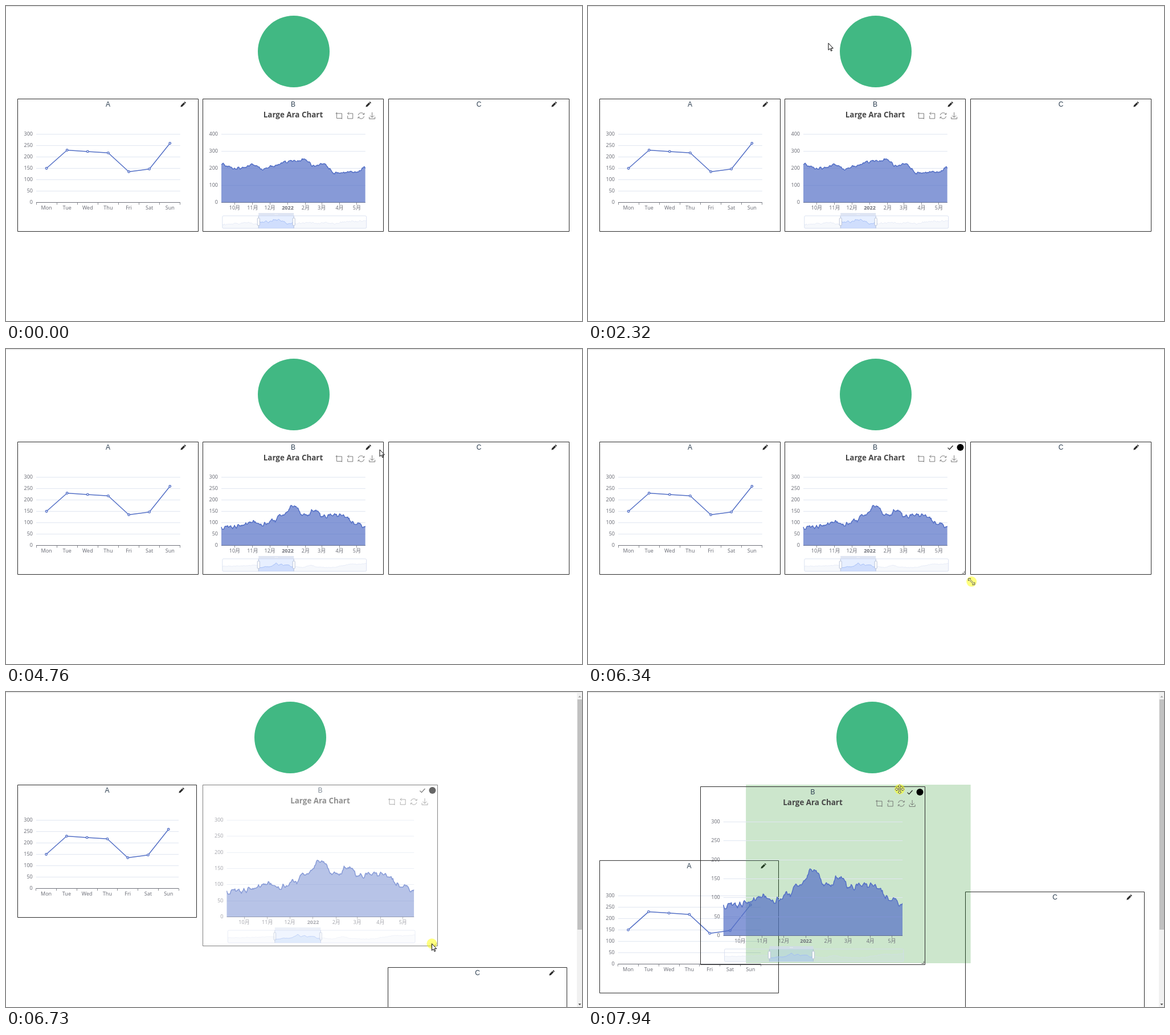
Recreate the animation shown at these times as an HTML page with a canvas. Size 1011 px wide and 554 px high, loop 8000 ms.

```html
<!DOCTYPE html>
<html lang="en">
<head>
<meta charset="utf-8">
<title>Chart dashboard</title>
<style>
html, body { margin: 0; width: 100%; height: 100%; overflow: hidden; background: #fff; }
canvas { display: block; }
</style>
</head>
<body>
<canvas id="stage" width="1011" height="554"></canvas>
<script>
const ctx = document.getElementById('stage').getContext('2d');
const LOOP = 8000, LAST_CHANGE = 7940;
const BLUE = '#5470c6', AXIS = '#6e7079', INK = '#2c3e50', BORDER = '#2a2a2a';
const LABEL_FONT = '9px "Noto Sans", "Noto Sans CJK SC", "Noto Sans CJK", sans-serif';
const TITLE_FONT = 'bold 13.4px "Open Sans", "Noto Sans", sans-serif';
const ROW_TOP = 163.5, ROW_PUSH = 321;

const RELOAD = { blank: 2900, shell: 3140, lineChart: 3220, areaChart: 3342 };
const EDIT = 5100, RESIZE = 6350, REFLOW = 6500, RELEASE = 7000, DRAG = 7700, SWAP = 7889.5;
const GRAB = { x: 692, y: 168 };

// Pointer visits: [time, x, y]
const VISITS = [
  [[120, 904, 468], [470, 250, -20]],
  [[2320, 421, 65], [2940, 1020, 300]],
  [[3960, 1012, 290], [4760, 656, 177], [4830, 656, 177], [4960, 636, 172], [5200, 636, 172],
   [5580, 684, 396], [6000, 653, 394], [6260, 653, 394], [6340, 673, 409], [6730, 747.5, 442.5],
   [RELEASE, 729.5, 472.5], [7120, 729.5, 472.5], [7650, GRAB.x, GRAB.y], [DRAG, GRAB.x, GRAB.y],
   [7870, 659, 169], [LAST_CHANGE, 547, 171]],
];
const PRESSES = [[5040, 5180], [6260, RELEASE], [DRAG, LOOP]];

const DAYS = ['Mon', 'Tue', 'Wed', 'Thu', 'Fri', 'Sat', 'Sun'];
const DAY_VALUES = [150, 230, 224, 218, 135, 147, 260];

const SAMPLES = 230, SELECTION = [.251, .496];
const clamp = v => Math.max(0, Math.min(1, v));
const mix = (a, b, k) => a + (b - a) * k;
const smooth = k => k * k * (3 - 2 * k);
const crisp = v => Math.floor(v) + .5;
const hash = n => { const s = Math.sin(n * 12.9898) * 43758.5453; return s - Math.floor(s); };

// Smooth noise in -1..1
function noise(x, seed) {
  const i = Math.floor(x), at = n => hash(n + seed * 1000) * 2 - 1;
  return mix(at(i), at(i + 1), smooth(x - i));
}

// CSS "ease" curve
function ease(x) {
  x = clamp(x);
  let lo = 0, hi = 1, u = .5;
  for (let i = 0; i < 20; i++) {
    u = (lo + hi) / 2;
    const at = .75 * u * (1 - u) + u ** 3;
    if (at < x) lo = u; else hi = u;
  }
  return 3 * (1 - u) * (1 - u) * u * .1 + 3 * (1 - u) * u * u + u ** 3;
}

// Evenly spaced trend levels, roughened by two scales of seeded noise.
function makeSeries({ max, step, trend, rough, floor, scale, ripple, seed }) {
  const level = k => {
    const x = k * (trend.length - 1), i = Math.min(Math.floor(x), trend.length - 2);
    return mix(trend[i], trend[i + 1], smooth(x - i));
  };
  const [from, to] = SELECTION, all = Array.from({ length: SAMPLES + 1 }, (_, i) => i);
  const values = all.map(i =>
    level(i / SAMPLES) + rough * (noise(i / 3, seed) + .35 * noise(i, seed + 1)));
  const overview = all.map(i => {
    const k = i / SAMPLES, inside = k > from && k < to;
    const height = inside ? (level((k - from) / (to - from)) - floor) * scale
      : 8.5 + 2.5 * noise(k * 18, seed + 2) + 7 * k ** 9;
    return height + ripple * noise(i / 1.5, seed + 3);
  });
  return { max, step, values, overview };
}

const BEFORE = makeSeries({
  max: 400, step: 100, rough: 9, floor: 70, scale: .085, ripple: 1.4, seed: 3,
  trend: [226, 200, 205, 220, 190, 215, 236, 240, 252, 214, 222, 172, 170, 178, 203],
});
const AFTER = makeSeries({
  max: 300, step: 50, rough: 9, floor: 0, scale: .083, ripple: .5, seed: 8,
  trend: [75, 80, 91, 101, 92, 108, 137, 175, 131, 152, 126, 134, 130, 97, 87],
});

// Month starts along a 250-day axis that opens 23 days before October.
const MONTHS = [10, 11, 12, 1, 2, 3, 4, 5].map((month, i) => ({
  label: month === 1 ? '2022' : month + '月',
  bold: month === 1,
  at: ((Date.UTC(2021, 9 + i, 1) - Date.UTC(2021, 9, 1)) / 864e5 + 23.2) / 250,
}));

function pointerAt(t) {
  const visit = VISITS.find(v => t >= v[0][0] && t <= v[v.length - 1][0]);
  if (!visit) return null;
  const i = Math.max(1, visit.findIndex(key => key[0] >= t));
  const [t0, x0, y0] = visit[i - 1], [t1, x1, y1] = visit[i];
  const k = (t - t0) / (t1 - t0);
  return { x: mix(x0, x1, k), y: mix(y0, y1, k) };
}

function line(points, color, width = 1) {
  ctx.beginPath();
  points.forEach(([x, y]) => ctx.lineTo(x, y));
  ctx.strokeStyle = color;
  ctx.lineWidth = width;
  ctx.stroke();
}

function area(points, base, color) {
  ctx.beginPath();
  points.forEach(([x, y]) => ctx.lineTo(x, y));
  ctx.lineTo(points[points.length - 1][0], base);
  ctx.lineTo(points[0][0], base);
  ctx.fillStyle = color;
  ctx.fill();
}

function rect(x, y, w, h, color) {
  ctx.fillStyle = color;
  ctx.fillRect(x, y, w, h);
}

function disc(x, y, r, color) {
  ctx.beginPath();
  ctx.arc(x, y, r, 0, Math.PI * 2);
  ctx.fillStyle = color;
  ctx.fill();
}

function text(str, x, y, font, color, align = 'center') {
  ctx.font = font;
  ctx.fillStyle = color;
  ctx.textAlign = align;
  ctx.fillText(str, x, y);
}

function shape(d, x, y, { fill, stroke, width = 1, turn = 0 }) {
  const path = new Path2D(d);
  ctx.save();
  ctx.translate(x, y);
  ctx.rotate(turn);
  if (fill) { ctx.fillStyle = fill; ctx.fill(path); }
  if (stroke) { ctx.strokeStyle = stroke; ctx.lineWidth = width; ctx.stroke(path); }
  ctx.restore();
}

function clipped(x, y, w, h, paint) {
  ctx.save();
  ctx.beginPath();
  ctx.rect(x, y, w, h);
  ctx.clip();
  paint();
  ctx.restore();
}

const ICON = {
  pencil: 'M-6.5 0L-4 -1.6H3V1.6H-4ZM3.8 -1.6H5.5V1.6H3.8Z',
  check: 'M-4.5 .3L-1.5 3.3L4.5 -3.3',
  tools: [
    'M-4.5 -6V4.5H4.5V-4H-6.5M4.5 4.5V6',
    'M-2 -4H4.5V5H-4.5V0M-2 -6.5L-4.5 -4L-2 -1.5M-4.5 -4H-2',
    'M-5.2 -1A5.3 5.3 0 0 1 4.6 -2.6M5.2 1A5.3 5.3 0 0 1 -4.6 2.6M5.4 -5V-2.3H2.6M-5.4 5V2.3H-2.6',
    'M0 -6V3M-3.5 -.5L0 3L3.5 -.5M-5 2V5.5H5V2',
  ],
  arrow: 'M0 0V12L2.8 9.5L4.6 13.8L6.4 13L4.6 8.9H8.3Z',
  doubleArrow: 'M-8 0L-5 -3V-1H5V-3L8 0L5 3V1H-5V3Z',
};

function drawPanel({ x, y, w, h }, name, editing) {
  const right = x + w;
  ctx.strokeStyle = BORDER;
  ctx.lineWidth = 1;
  ctx.strokeRect(x, y, w, h);
  text(name, x + w / 2, y + 13.3, '12px "Liberation Sans", Arial, sans-serif', INK);
  if (!editing) {
    shape(ICON.pencil, right - 26.5, y + 9.5, { fill: '#2b2b2b', turn: -Math.PI / 4 });
    return;
  }
  shape(ICON.check, right - 26.5, y + 9.8, { stroke: '#222', width: 1.3 });
  disc(right - 9, y + 9.5, 6, '#000');
  line([[right - 2, y + h - 6], [right - 2, y + h - 2], [right - 6, y + h - 2]], '#666');
}

const gridOf = ({ x, y, w, h }) => ({
  left: x + w * .1 + .8, right: x + w * .9, top: y + 62, bottom: y + h - 51,
});

function drawScale(g, max, step) {
  for (let v = 0; v <= max; v += step) {
    const y = crisp(mix(g.bottom, g.top, v / max));
    if (v) line([[g.left, y], [g.right, y]], '#e0e6f1');
    text(v, g.left - 6, y + 2.8, LABEL_FONT, AXIS, 'right');
  }
}

function drawBaseline(g, ticks) {
  const y = crisp(g.bottom);
  line([[g.left, y], [g.right, y]], AXIS);
  for (const k of ticks) {
    const x = crisp(mix(g.left, g.right, k));
    line([[x, y], [x, y + 4]], AXIS, .8);
  }
}

function reveal(g, elapsed, paint) {
  const progress = clamp(elapsed / 1000);
  clipped(g.left - 2, g.top - 10, (g.right - g.left) * progress + 2, g.bottom - g.top + 11, paint);
}

function drawLineChart(box, elapsed) {
  const g = gridOf(box), n = DAYS.length;
  const slot = i => (i + .5) / n;
  drawScale(g, 300, 50);
  drawBaseline(g, Array.from({ length: n + 1 }, (_, i) => i / n));
  const points = DAY_VALUES.map((v, i) =>
    [mix(g.left, g.right, slot(i)), mix(g.bottom, g.top, v / 300)]);
  reveal(g, elapsed, () => line(points, BLUE, 1.5));
  points.forEach(([x, y], i) => {
    text(DAYS[i], x, g.bottom + 12.3, LABEL_FONT, AXIS);
    const size = clamp((elapsed - slot(i) * 1000) / 200);
    disc(x, y, 2.4 * size, BLUE);
    disc(x, y, 1.1 * size, '#fff');
  });
}

function drawSlider(box, g, overview) {
  const left = g.left + 1.8, width = g.right - g.left, height = 22;
  const top = box.y + box.h - 27.5, bottom = top + height;
  const [from, to] = SELECTION.map(k => left + width * k);
  const points = overview.map((v, i) => [left + width * i / SAMPLES, bottom - v]);

  area(points, bottom, 'rgba(210,219,238,.2)');
  line(points, '#d2dbee', .5);
  ctx.strokeStyle = '#d2dbee';
  ctx.lineWidth = .8;
  ctx.beginPath();
  ctx.roundRect(left, top, width, height, 2);
  ctx.stroke();

  rect(from, top, to - from, height, 'rgba(135,175,255,.2)');
  clipped(from, top, to - from, height, () => {
    area(points, bottom, 'rgba(143,176,247,.2)');
    line(points, '#8fb0f7', .6);
  });

  rect(from, top - 5, to - from, 5, 'rgba(210,219,238,.7)');
  for (const d of [-2, 0, 2]) disc((from + to) / 2 + d, top - 2.5, .6, '#fff');
  for (const x of [from, to]) {
    line([[x, top], [x, bottom]], '#acb8d1', .8);
    ctx.fillStyle = '#fff';
    ctx.beginPath();
    ctx.roundRect(x - 2, top + 4, 4, 13, 1);
    ctx.fill();
    ctx.stroke();
  }
}

function drawAreaChart(box, { values, max, step, overview }, elapsed) {
  const g = gridOf(box);
  text('Large Ara Chart', box.x + box.w / 2, box.y + 32, TITLE_FONT, '#464646');
  const inset = 77.5 + Math.min(2.5, (box.w - 317) * .04);
  ICON.tools.forEach((d, i) =>
    shape(d, box.x + box.w - inset + i * 19.2, box.y + 29.5, { stroke: '#666', width: .85 }));

  drawScale(g, max, step);
  const points = values.map((v, i) =>
    [mix(g.left, g.right, i / SAMPLES), mix(g.bottom, g.top, v / max)]);
  drawBaseline(g, MONTHS.map(m => m.at));
  reveal(g, elapsed, () => {
    area(points, g.bottom, 'rgba(84,112,198,.7)');
    line(points, BLUE, 1.5);
  });
  for (const { label, bold, at } of MONTHS) {
    text(label, mix(g.left, g.right, at), g.bottom + 12.3, (bold ? 'bold ' : '') + LABEL_FONT, AXIS);
  }
  drawSlider(box, g, overview);
}

function drawScrollbar() {
  rect(1002, 1, 9, 553, '#f1f1f1');
  rect(1003, 13, 8, 405, '#c1c1c1');
  const triangle = 'M-2.5 1.5L0 -1.5L2.5 1.5Z';
  shape(triangle, 1007, 8, { fill: '#a3a3a3' });
  shape(triangle, 1007, 549.5, { fill: '#505050', turn: Math.PI });
}

function drawPointer(t) {
  const p = pointerAt(t);
  if (!p) return;
  if (PRESSES.some(([from, to]) => t >= from && t <= to)) disc(p.x, p.y, 9, 'rgba(255,255,0,.5)');
  const arrows = turn =>
    shape(ICON.doubleArrow, p.x, p.y, { fill: '#ffffa0', stroke: '#444', width: .8, turn });
  if (t >= 5880 && t < REFLOW) {
    arrows(Math.PI / 4);
  } else if (t >= 7600) {
    arrows(0);
    arrows(Math.PI / 2);
  } else {
    shape(ICON.arrow, p.x, p.y, { fill: '#fff', stroke: '#000' });
  }
}

function layout(t) {
  const narrow = t >= REFLOW + 40;
  const w = narrow ? 314 : 317, h = 233;
  const swap = ROW_PUSH * ease((t - SWAP) / 200);
  const a = { x: 20.5, y: ROW_TOP + swap, w, h };
  const b = { x: 345.5, y: ROW_TOP, w: 317, h };
  const c = {
    x: narrow ? mix(670.5, 662.5, ease((t - 6760) / 200)) : 671.5,
    y: ROW_TOP + ROW_PUSH * ease((t - REFLOW) / 200) - swap, w, h,
  };
  if (t >= RESIZE) {
    const corner = pointerAt(Math.min(t, RELEASE));
    b.w = corner.x - 335.5;
    b.h = corner.y - 159.5;
    b.x -= 3 * ease((t - RELEASE) / 100);
  }
  if (t >= DRAG) {
    const p = pointerAt(t);
    b.x += p.x - GRAB.x;
    b.y += p.y - GRAB.y;
  }
  const ghost = { x: 342 - 80.4 * ease((t - SWAP) / 100), y: 163, w: 394.5, h: 314 };
  return { a, b, c, ghost, narrow };
}

function draw(t) {
  rect(0, 0, 1011, 554, '#fff');
  rect(0, 0, 1011, 1.5, '#e6e6e6');

  const reloaded = t >= RELOAD.shell;
  if (t < RELOAD.blank || reloaded) {
    const { a, b, c, ghost, narrow } = layout(t);
    const since = start => reloaded ? t - start : Infinity;
    disc(narrow ? 499 : 505, 80, 63, '#41b883');
    drawPanel(a, 'A', false);
    drawPanel(c, 'C', false);
    if (since(RELOAD.lineChart) >= 0) drawLineChart(a, since(RELOAD.lineChart));
    if (t >= DRAG) rect(ghost.x, ghost.y, ghost.w, ghost.h, 'rgba(0,128,0,.2)');
    ctx.globalAlpha = t >= RESIZE && t < RELEASE ? .6 : 1;
    drawPanel(b, 'B', t >= EDIT);
    if (since(RELOAD.areaChart) >= 0) {
      drawAreaChart(b, reloaded ? AFTER : BEFORE, since(RELOAD.areaChart));
    }
    ctx.globalAlpha = 1;
    if (narrow) drawScrollbar();
  }
  drawPointer(t);
}

ctx.lineJoin = 'round';
function tick(now) {
  draw(Math.min(now % LOOP, LAST_CHANGE));
  requestAnimationFrame(tick);
}
requestAnimationFrame(tick);
</script>
</body>
</html>
```
